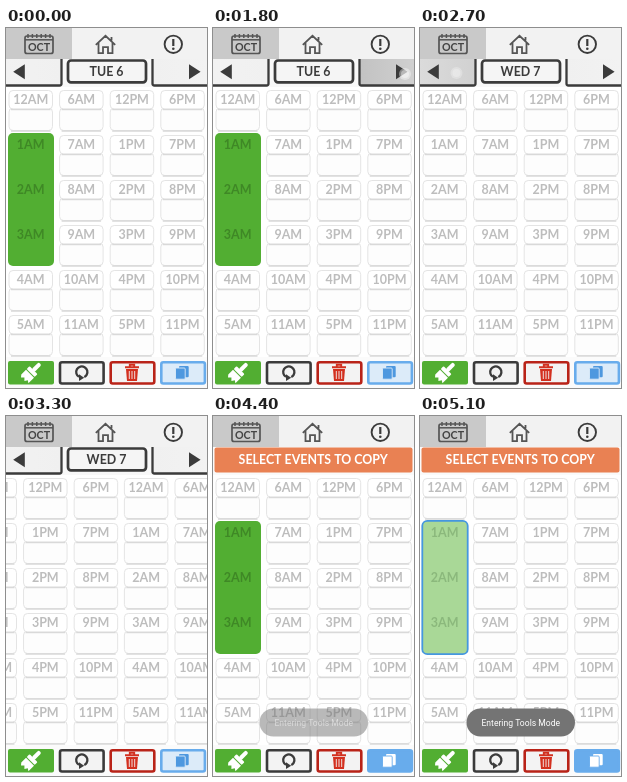
Write an HTML page with a canvas that moves like this. It is 201 by 360 pixels and loops after 5.2 s.

```html
<!DOCTYPE html>
<html lang="en">
<head>
<meta charset="utf-8">
<title>Day planner</title>
<style>
html, body { margin: 0; width: 100%; height: 100%; overflow: hidden; background: #fff; }
canvas { display: block; width: 100%; height: 100%; }
</style>
</head>
<body>
<canvas id="stage"></canvas>
<script>
const W = 201, H = 360, LOOP = 5200, STEP = 100;
const PAGE = 202, COL = 50.6, ROW = 45;
const DARK = '#3b3b3b', GREEN = '#52ae32', BLUE = '#68acec', RED = '#b92318';
const canvas = document.getElementById('stage');
const c = canvas.getContext('2d');
const ratio = window.devicePixelRatio || 1;
canvas.width = W * ratio;
canvas.height = H * ratio;
c.scale(ratio, ratio);

const clamp = v => Math.max(0, Math.min(1, v));
const ramp = (t, start, length) => clamp((t - start) / length);
const slide = (t, start) => 1 - (1 - ramp(t, start, 400)) ** 2.75;
// Rises before start, holds, and falls to zero at end.
const pulse = (t, start, end, fade = 150) =>
  Math.min(ramp(t, start - fade, fade), 1 - ramp(t, end - fade, fade));

function box(x, y, w, h, r, fill, stroke, line = 1) {
  c.beginPath();
  c.roundRect(x, y, w, h, r);
  if (fill) { c.fillStyle = fill; c.fill(); }
  if (stroke) { c.strokeStyle = stroke; c.lineWidth = line; c.stroke(); }
}

function path(d, fill, stroke, line = 1.5) {
  const p = new Path2D(d);
  if (fill) { c.fillStyle = fill; c.fill(p); }
  if (stroke) { c.strokeStyle = stroke; c.lineWidth = line; c.stroke(p); }
}

function disc(x, y, r, fill) {
  c.beginPath();
  c.arc(x, y, r, 0, 7);
  c.fillStyle = fill;
  c.fill();
}

function arc(x, y, r, from, to, line) {
  c.beginPath();
  c.arc(x, y, r, from, to);
  c.lineWidth = line;
  c.strokeStyle = DARK;
  c.stroke();
}

function text(s, x, y, size, color, weight = 700, family = 'Lato') {
  c.font = `${weight} ${size}px ${family}, sans-serif`;
  c.textAlign = 'center';
  c.textBaseline = 'alphabetic';
  c.fillStyle = color;
  c.fillText(s, x, y);
}

function gradient(x1, x2, from, to) {
  const g = c.createLinearGradient(x1, 0, x2, 0);
  g.addColorStop(0, from);
  g.addColorStop(1, to);
  return g;
}

function drawEvent(selected) {
  if (selected) box(2.3, 104.8, 45.4, 133.4, 5, '#a9d897', '#4597df', 1.8);
  else box(2, 105, 46, 133, 5, GREEN);
  for (let row = 1; row < 4; row++)
    text(row + 'AM', 24.7, 75.6 + row * ROW, 12.5, selected ? '#8bb87c' : '#3f8826');
}

function drawDay(x, hasEvent, selected) {
  c.save();
  c.translate(x, 0);
  for (let hour = 0; hour < 24; hour++) {
    const col = Math.floor(hour / 6), row = hour % 6;
    const left = 3 + col * COL, top = 62 + row * ROW;
    if (hasEvent && !col && row > 0 && row < 4) continue;
    box(left, top + 18, 43.5, 22.5, 4, '#fdfdfd', '#e4e4e4');
    box(left, top + .5, 43.5, 18.5, 4, '#fff', '#e4e4e4');
    path(`M${left + 2} ${top + 19.5}h39.5M${left + 2} ${top + 41}h39.5`, null, '#d9d9d9', 1.4);
    text((hour % 12 || 12) + (hour < 12 ? 'AM' : 'PM'), left + 21.7, top + 13.6, 12.5, '#bdbdbd');
  }
  if (hasEvent) drawEvent(selected);
  c.restore();
}

function drawTabs() {
  c.fillStyle = '#f2f2f2';
  c.fillRect(0, 0, W, 31);
  c.fillStyle = '#c9c9c9';
  c.fillRect(0, 0, 66, 31);
  box(19, 8, 28, 17.5, 2, null, '#555', 1.7);
  path('M19 11.8H47', null, '#555', 1.5);
  for (let x = 22; x < 47; x += 4.4) path(`M${x} 6V10`, null, '#555', 1.5);
  text('OCT', 33, 22.7, 10.7, '#444');
  path('M89.8 16.8L99.5 7.8L109.2 16.8M92.5 15V25.2H97V19.2H102V25.2H106.5V15M105.5 12.5V9',
    null, '#555', 1.8);
  arc(167.3, 16.3, 8.7, 0, 7, 1.9);
  path('M167.3 11V18', null, DARK, 2.2);
  disc(167.3, 20.8, 1.3, DARK);
}

function drawDayBar(title, left, right) {
  c.fillStyle = '#f8f8f8';
  c.fillRect(0, 31, W, 28);
  const shade = v => `rgb(${v},${v},${v})`;
  const side = (x, d, near, far, press) => {
    c.fillStyle = gradient(near, far, shade(242 - 34 * press), shade(240 - 46 * press));
    c.fillRect(x, 31, 55, 26.5);
    path(d, null, DARK, 2.3);
  };
  side(0, 'M0 57.5H53.5Q55.5 57.5 55.5 55.5V31', 0, 55, left);
  side(146.5, 'M201 57.5H148.5Q146.5 57.5 146.5 55.5V31', 201, 147, right);
  path('M18.8 36.3V51.3L7.2 43.8Z', DARK);
  path('M183 36.3V51.3L194.6 43.8Z', DARK);
  box(62, 32.5, 78, 21.8, 3, '#f5f5f5', DARK, 2.7);
  text(title, 100.5, 47.8, 12.4, DARK);
}

function drawTools(copying) {
  const paper = copying ? BLUE : '#dcebf9', ink = copying ? '#fff' : '#4e98df';
  c.fillStyle = '#fbfbfb';
  c.fillRect(0, 329, W, 31);
  box(2, 333, 46, 23.5, 2, GREEN);
  const button = (x, fill, edge) => box(x, 334.2, 43.6, 21.3, 2, fill, edge, 2.6);
  button(54, '#f3f3f3', DARK);
  button(104.7, '#f3f3f3', RED);
  button(155.3, paper, BLUE);

  c.save();
  c.translate(25.2, 344.5);
  c.rotate(Math.PI / 4);
  c.scale(1.2, 1.2);
  box(-1.7, -10.5, 3.4, 8.5, 1.5, '#fff');
  box(-4.7, -2.8, 9.4, 3.4, .8, '#fff');
  path('M-4.7 1.4H4.7V8L2.5 6.5L1 9L-1 7L-3 9L-4.7 7Z', '#fff');
  c.restore();

  // Clockwise loop, open at the foot.
  arc(75.8, 344, 5.6, 2.1, 7.4, 2.3);
  path('M73 346.3L78.2 349.8L73 353Z', DARK);

  const red = '#d3301f';
  path('M119 339.3H133M123.8 338.5V336.8H128.2V338.5', null, red, 1.9);
  path('M120 341H132L131 353H121Z', red);
  path('M123.3 343V351M126 343V351M128.7 343V351', null, '#f3f3f3', .9);

  box(173, 338, 9.7, 11.2, 1, ink);
  box(169.5, 340, 9.7, 11.2, 1, ink, paper, .9);
}

function drawBanner() {
  c.fillStyle = '#fafafa';
  c.fillRect(0, 31, W, 28);
  box(1.5, 31.5, 198, 25, 2, '#e98153');
  text('SELECT EVENTS TO COPY', 100.2, 48.4, 12.4, '#fff');
}

function drawToast(alpha) {
  c.save();
  c.globalAlpha = alpha;
  box(46.5, 292.5, 108.5, 28, 14, '#747474');
  text('Entering Tools Mode', 100.8, 310, 8.6, '#fff', 400, 'Roboto');
  c.restore();
}

function drawTouch(x, y, amount) {
  if (!amount) return;
  c.save();
  c.globalAlpha = amount;
  disc(x, y, 6, 'rgba(255,255,255,.4)');
  disc(x, y, 4, 'rgba(255,255,255,.4)');
  c.restore();
}

function draw(t) {
  const ahead = slide(t, 2000) - slide(t, 3194);
  const copying = t >= 4300;
  const next = pulse(t, 1600, 2100), back = pulse(t, 2750, 3200);
  c.fillStyle = '#fff';
  c.fillRect(0, 0, W, H);
  drawDay(-PAGE * ahead, true, t >= 4900);
  if (ahead > 0) drawDay(PAGE * (1 - ahead), false, false);
  drawTabs();
  if (copying) drawBanner();
  else drawDayBar(t >= 2400 && t < 3500 ? 'WED 7' : 'TUE 6', back, next);
  drawTools(copying);
  drawToast(ramp(t, 4250, 300));
  drawTouch(192, 46, next);
  drawTouch(36.5, 45, back);
  drawTouch(177, 345, pulse(t, 4050, 4400));
  drawTouch(25, 185, pulse(t, 4700, 5050));
}

const start = performance.now();
function tick() {
  const t = (performance.now() - start) % LOOP;
  draw(Math.floor(t / STEP) * STEP);
  requestAnimationFrame(tick);
}
tick();
</script>
</body>
</html>
```
